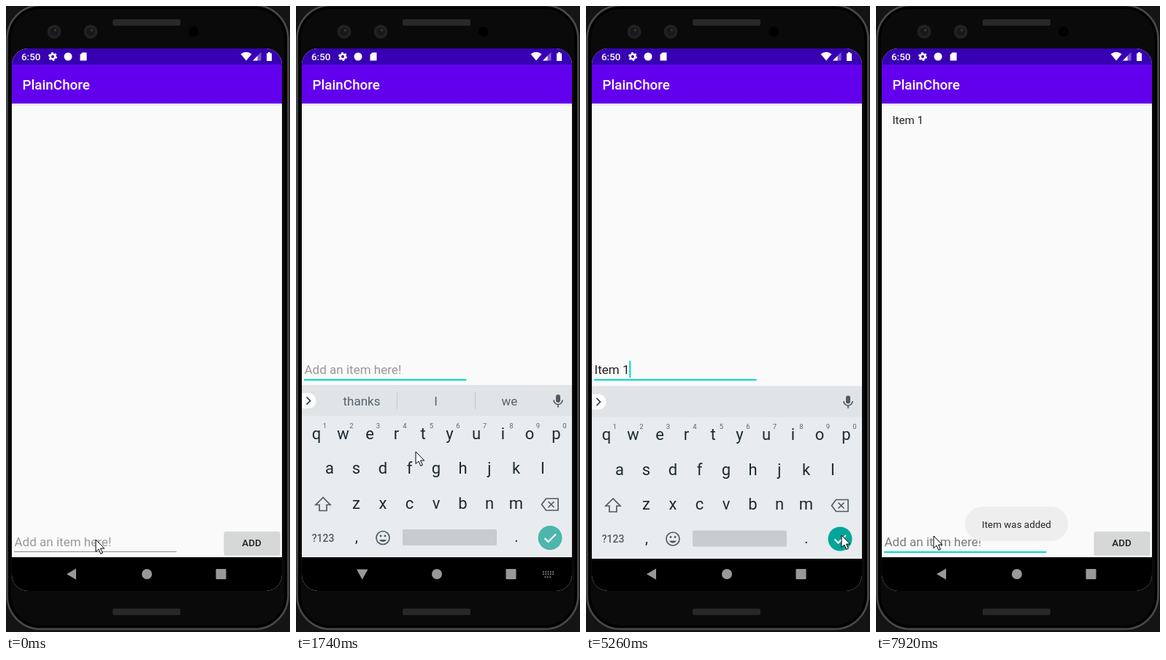
An HTML page that plays this animation: 389x854 px, repeating every 8000 ms.

```html
<!DOCTYPE html>
<html lang="en">
<head>
<meta charset="utf-8">
<title>Todo demo</title>
<style>
html, body { margin: 0; height: 100%; overflow: hidden; background: #0b0b0b; }
svg { display: block; font-family: Roboto, sans-serif; }
text { white-space: pre; }
.mid { text-anchor: middle; }
.medium { font-weight: 500; }
.line { fill: none; stroke: #4f5b62; stroke-width: 1.7; }
</style>
</head>
<body>
<svg width="389" height="854" viewBox="0 0 389 854">
  <defs>
    <clipPath id="screen"><rect x="8" y="58" width="370" height="740" rx="22"/></clipPath>
    <clipPath id="content"><rect x="8" y="133" width="370" height="621"/></clipPath>
    <clipPath id="buttonClip"><rect x="299" y="717" width="76" height="31" rx="2"/></clipPath>
    <linearGradient id="shade" x2="0" y2="1">
      <stop stop-color="#dedede"/><stop offset="1" stop-color="#fafafa"/>
    </linearGradient>
    <pattern id="mesh" width="2" height="2" patternUnits="userSpaceOnUse">
      <rect width="2" height="2" fill="#2c2c2c"/><rect width="1" height="1" fill="#1c1c1c"/>
    </pattern>
  </defs>

  <!-- phone body -->
  <rect width="389" height="854" fill="#141414"/>
  <rect x="1.5" y="-1" width="385" height="851" rx="46" fill="#0a0a0a" stroke="#4a4a4a" stroke-width="2.5"/>
  <rect x="5" y="2.5" width="378" height="844" rx="42" fill="#0a0a0a" stroke="#000" stroke-width="3"/>
  <rect x="146" y="18" width="93" height="9" rx="3" fill="url(#mesh)"/>
  <rect x="146" y="822" width="93" height="9" rx="3" fill="url(#mesh)"/>
  <g id="cameras"></g>
  <circle cx="257" cy="35" r="7" fill="#000"/>

  <g clip-path="url(#screen)">
    <rect x="8" y="58" width="370" height="740" fill="#fafafa"/>
    <rect x="8" y="133" width="370" height="4" fill="url(#shade)"/>
    <rect x="8" y="58" width="370" height="22" fill="#3700b3"/>
    <rect x="8" y="80" width="370" height="53" fill="#6200ee"/>
    <text x="22.5" y="114" font-size="18.84" class="medium" fill="#fff">PlainChore</text>

    <!-- status bar -->
    <g fill="#fff">
      <text x="21" y="74" font-size="13.4" class="medium">6:50</text>
      <circle cx="64" cy="69" r="3.3" fill="none" stroke="#fff" stroke-width="2.6"/>
      <circle cx="64" cy="69" r="5" fill="none" stroke="#fff" stroke-width="2" stroke-dasharray="2.6 2.636"/>
      <circle cx="85" cy="69" r="5.5"/>
      <path d="M104.5 63.5H110.5V74.5H101.5V66.5Z"/>
      <path d="M321.5 65.5Q329 60 336.5 65.5L329 74.5Z"/>
      <path d="M338 74.5L349.5 63V74.5Z" opacity=".35"/>
      <path d="M338 74.5L344.5 68V74.5Z"/>
      <path d="M357 64.5h2v-1.500h3v1.500h2v10.500h-7Z"/>
    </g>

    <!-- list and input row -->
    <text id="entry" x="22.5" y="161" font-size="15.07" fill="#212121">Item 1</text>
    <g id="button">
      <rect x="298.5" y="717.5" width="77" height="32" rx="2.5" fill="#000" opacity=".16"/>
      <rect x="299" y="717" width="76" height="31" rx="2" fill="#d6d7d7"/>
      <circle id="ripple" cx="347" cy="733" r="27" fill="#000" opacity=".08" clip-path="url(#buttonClip)"/>
      <text x="336.5" y="737" font-size="13.4" class="mid medium" fill="#212121">ADD</text>
    </g>
    <g id="field">
      <text id="input" x="11.5" y="737" font-size="17.05"></text>
      <rect id="compose" x="12" y="739" height="1" fill="#212121"/>
      <rect id="rule" x="11" y="744" width="222.5"/>
      <rect id="caret" y="719" width="2" height="23" fill="#03dac5"/>
    </g>

    <g clip-path="url(#content)"><g id="keyboard">
      <rect x="8" y="517" width="370" height="240" fill="#e8ecef"/>
      <rect x="8" y="517" width="370" height="42" fill="#e0e4e7"/>
      <path d="M8 528h9a10.5 10.5 0 0 1 0 21h-9Z" fill="#fff"/>
      <path d="M14.5 533.5l5 5l-5 5" class="line" style="stroke:#263238"/>
      <g id="words" font-size="17" class="mid" fill="#56636a">
        <path d="M138.5 527v23M245.5 527v23" stroke="#c3c8cb"/>
        <text x="90" y="545"></text><text x="191.5" y="545"></text><text x="292.5" y="545"></text>
      </g>
      <rect x="356" y="530" width="6" height="11" rx="3" fill="#4f5b62"/>
      <path d="M353 537.5a6 6 0 0 0 12 0M359 543.5v4" class="line"/>
      <g id="keys" class="mid" fill="#1c2930"></g>
      <path d="M37 670.5l-10 10h5v8h10v-8h5Z" class="line"/>
      <path d="M336.5 680l6-8h16.5v16h-16.5ZM345.5 676l8 8m0-8l-8 8" class="line"/>
      <text x="37" y="730.5" font-size="14" class="mid medium" fill="#4f5b62">?123</text>
      <circle cx="119" cy="725.5" r="9" class="line"/>
      <path d="M114 728a5.5 5 0 0 0 10 0Z" fill="#4f5b62"/>
      <circle cx="116" cy="723" r="1.4" fill="#4f5b62"/><circle cx="122" cy="723" r="1.4" fill="#4f5b62"/>
      <rect x="146" y="714" width="129" height="22" rx="2" fill="#c8cccf"/>
      <circle id="done" cx="348" cy="725.5" r="16.5"/>
      <path d="M340.5 726l5 5l10.5-10.5" fill="none" stroke="#fff" stroke-width="2.2"/>
    </g></g>

    <!-- navigation bar -->
    <rect id="navBar" x="8" width="370" height="47"/>
    <g fill="#999">
      <path id="back"/>
      <circle cx="193" cy="775" r="7"/>
      <rect x="287.5" y="768" width="14" height="14" rx="1"/>
      <path id="switcher" d="M338 772h15M338 775h15M340.5 779h10" fill="none" stroke="#999" stroke-width="1.7" stroke-dasharray="1.8 1.5"/>
    </g>

    <g id="toast">
      <rect x="122" y="683" width="141" height="47" rx="23.5" fill="#eee" opacity=".95"/>
      <text x="192.5" y="712" font-size="13.4" class="mid" fill="#262626">Item was added</text>
    </g>
  </g>
  <path id="pointer" d="M0 0V16.5L4 13L6.7 19.3L9.3 18.2L6.6 12H11.7Z" fill="#fff" stroke="#000"/>
</svg>
<script>
const LOOP = 8000, HINT = "Add an item here!";
const $ = id => document.getElementById(id);
const set = (id, attrs) => { for (const k in attrs) $(id).setAttribute(k, attrs[k]); };
const show = (id, on) => set(id, { visibility: on ? "visible" : "hidden" });
const clamp = v => Math.max(0, Math.min(1, v));
const within = (t, a, b) => t >= a && t < b;
const latest = (list, t) => list.filter(e => e[0] <= t).pop();

// Bursts of screen updates: first, last, count
const bursts = [[0, 0, 1], [260, 530, 3], [810, 1050, 3], [1200, 1740, 5], [2270, 2270, 1],
  [2700, 2700, 1], [3230, 3500, 3], [3780, 3780, 1], [4050, 4050, 1], [4330, 5260, 8],
  [5410, 5530, 2], [5810, 6210, 4], [6330, 6840, 4], [6960, 7920, 8]];
const typed = [[0, ""], [3230, "I"], [3360, "Ite"], [3500, "Item"], [3780, "Item "], [4050, "Item 1"], [6330, ""]];
const guesses = [[0, "thanks,I,we"], [3230, "I,I'm,It"], [3360, "Item,Items,Itemized"], [3780, "is,in,the"], [4050, ""]];
const caretOn = [[260, 810], [1200, 1740], [2270, 2700], [3230, 4600], [5100, 5810], [6070, 6840], [7220, 7620]];
const path = [[0, 123, 728], [1070, 123, 728], [1740, 164, 608], [4200, 164, 608], [5125, 350, 722],
  [5680, 350, 722], [6070, 347, 730], [6840, 347, 730], [7380, 215, 703], [7920, 79, 723], [8000, 79, 723]];

function snap(t) {
  const [a, b, n] = latest(bursts, t);
  if (t >= b) return b;
  const step = (b - a) / (n - 1);
  return a + Math.floor((t - a) / step + 1e-6) * step;
}

function pointerAt(t) {
  const i = Math.max(1, path.findIndex(p => p[0] >= t));
  const [a, x, y] = path[i - 1], [b, X, Y] = path[i];
  const u = (t - a) / (b - a), e = u * u * (3 - 2 * u);
  return `translate(${x + (X - x) * e} ${y + (Y - y) * e})`;
}

function buildKeys() {
  const key = (c, x, y, size = 22) => `<text x="${x}" y="${y}" font-size="${size}">${c}</text>`;
  const row = (chars, x, y) => [...chars].map((c, i) => key(c, x + 36.5 * i, y)).join("");
  const digits = [..."1234567890"].map((c, i) => key(c, 39.5 + 36.5 * i, 575.5, 9.5)).join("");
  $("keys").innerHTML = row("qwertyuiop", 28, 590.5) + row("asdfghjkl", 46, 638) + row("zxcvbnm", 82.5, 685.5) +
    `<g fill="#5b676d">${digits}</g>` + key(",", 83, 731, 20) + key(".", 302, 731, 20);
  $("cameras").innerHTML = [66, 116].map(x => `<circle cx="${x}" cy="35" r="9.5" fill="#202123"/>
    <circle cx="${x}" cy="35" r="5.5" fill="#17181a"/><circle cx="${x + 1.5}" cy="33" r="1.5" fill="#3c3f44"/>`).join("");
}

function draw(t) {
  const raised = within(t, 930, 5400), focus = t >= 260;
  set("field", { transform: `translate(0 ${raised ? -235 : 0})` });
  show("button", !raised);
  show("ripple", within(t, 6070, 6600));
  show("entry", t >= 6330);

  const text = latest(typed, t)[1], composing = within(t, 3230, 3700);
  $("input").textContent = text || HINT;
  set("input", { fill: text ? "#212121" : t >= 6330 ? "#7c7c7c" : "#999" });
  const width = text ? $("input").getComputedTextLength() : 0;
  show("compose", composing);
  set("compose", { width: composing ? width - .5 : 0 });
  set("rule", focus ? { height: 2, fill: "#03dac5" } : { height: 1, fill: "#8a8a8a" });
  show("caret", caretOn.some(([a, b]) => within(t, a, b)));
  set("caret", { x: 11.3 + width });

  // keyboard slides in, later drops out
  const rise = clamp((t - 680) / 460), fall = clamp((t - 5230) / 375);
  const drop = 236 * ((1 - rise) ** 3 + fall ** 2);
  show("keyboard", within(t, 810, 5525));
  set("keyboard", { transform: `translate(0 ${drop})`, opacity: clamp(rise * 1.2) * (1 - fall ** 2) });
  set("done", { fill: t > 5100 ? "#00a699" : "#4db6ac" });
  const words = latest(guesses, t)[1];
  $("words").style.display = words ? "" : "none";
  words.split(",").forEach((w, i) => $("words").children[i + 1].textContent = w);

  const open = within(t, 810, 5255);
  set("back", { d: open ? "M83 768.5h15.5l-7.75 14Z" : "M83 775l13-7.5v15Z" });
  show("switcher", open);
  set("navBar", { y: within(t, 810, 1200) || within(t, 5255, 5400) ? 754 : 752 });
  set("toast", { opacity: clamp((t - 6300) / 400) });
  set("pointer", { transform: pointerAt(t) });
}

buildKeys();
const start = performance.now();
function tick(now) {
  draw(snap(Math.max(0, now - start) % LOOP));
  requestAnimationFrame(tick);
}
tick(start);
</script>
</body>
</html>
```
